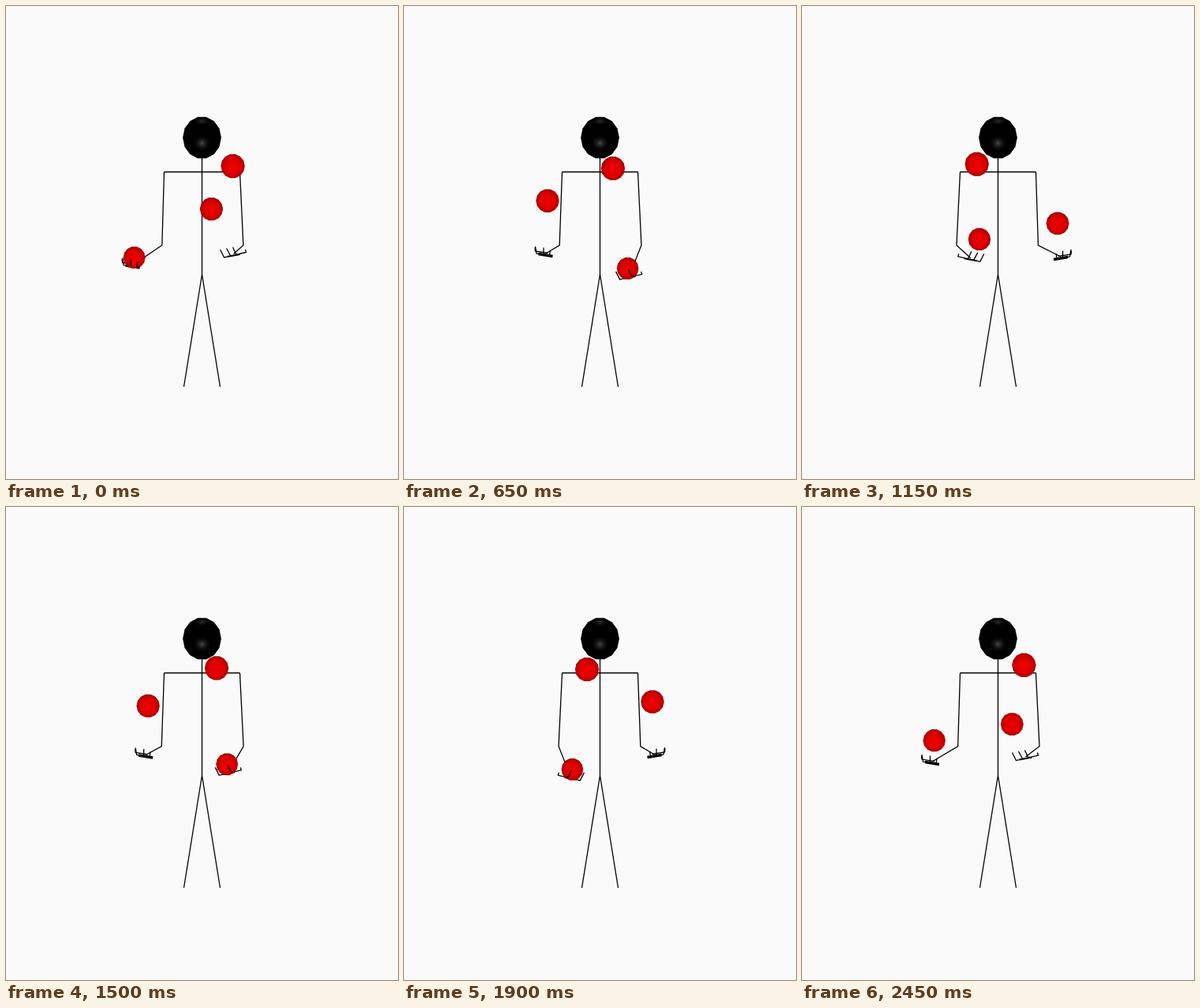
Recreate the animation shown at these times as an HTML page with a canvas. Size 497 by 600 pixels, loop 2.5 s.

```html
<!DOCTYPE html>
<html lang="en">
<head>
<meta charset="utf-8">
<title>Three-ball cascade</title>
<style>
  html, body { margin: 0; width: 100%; height: 100%; overflow: hidden; background: #fafafa; }
  canvas { display: block; }
</style>
</head>
<body>
<canvas id="stage" width="497" height="600"></canvas>
<script>
const ctx = document.getElementById('stage').getContext('2d');
const LOOP = 2500, STEP = 50;
const BEAT = LOOP / 6;        // time between throws of alternate hands
const CYCLE = 2 * BEAT;       // one hand's throw-to-throw time
const TRIP = 3 * BEAT;        // one ball's hold plus flight
const RELEASE = 267;
const MID = 248.5;

// Path of the empty hand: time, x from the body axis, y
const RETURN = [
  [267, -32, 331.5], [300, -34.5, 323.5], [367, -35, 319], [417, -40, 316.5],
  [533, -53, 313.8], [650, -69, 316], [717, -78, 318.7], [783, -83.5, 325], [CYCLE, -88, 331]
];

// Finger lines around the palm, for the throwing and the catching pose
const THROW = {
  palm: [-8, -1.5, 8, 1.5],
  inner: [8, 1.5, 12, 2.5, 17, -7.5],
  middle: [4, 0, 9, -9],
  outer: [-6, -1.5, -3, -1.5, 1, -10.5],
  thumb: [-7, -2, -16, -4, -15, -7.5]
};
const CATCH = {
  palm: [-9, -1.5, 9, 1.5],
  inner: [8, 1.5, 5, 0, 6, -6],
  middle: [-2.5, -1, -2.5, -9.5],
  outer: [-8, -1.5, -11.5, -2, -13, -11],
  thumb: [3, -2.5, -13, -5, -13.5, -9.5]
};

const mix = (a, b, k) => a + (b - a) * k;
const smooth = k => { k = Math.min(1, Math.max(0, k)); return k * k * (3 - 2 * k); };

function hermite(a, b, va, vb, span, s) {
  const s2 = s * s, s3 = s2 * s;
  return a * (2 * s3 - 3 * s2 + 1) + b * (3 * s2 - 2 * s3)
    + span * (va * (s3 - 2 * s2 + s) + vb * (s3 - s2));
}

function flight(u) {
  const y = 200.3 + 0.000491 * (u - 758) ** 2;
  return [0.117 * (u - 516) * (1 + 0.00045 * (318 - y)), y];
}

// Ball caught on the left at 0, thrown to the right, caught there at TRIP
function ballAt(u) {
  if (u >= RELEASE) return flight(u);
  const [x0, y0] = flight(TRIP), [x1, y1] = flight(RELEASE), s = u / RELEASE;
  return [
    hermite(-x0, x1, -0.105, 0.122, RELEASE, s),
    hermite(y0, y1, 0.483, -0.482, RELEASE, s)
  ];
}

function palmAt(p) {
  if (p < RELEASE) {
    const [x, y] = ballAt(p);
    return [x - 2, y + 11.5];
  }
  let i = 0;
  while (i < RETURN.length - 2 && p >= RETURN[i + 1][0]) i++;
  const a = RETURN[i], b = RETURN[i + 1], span = b[0] - a[0];
  const slope = (j, c) => {
    const l = RETURN[Math.max(0, j - 1)], r = RETURN[Math.min(RETURN.length - 1, j + 1)];
    return (r[c] - l[c]) / (r[0] - l[0]);
  };
  const at = c => hermite(a[c], b[c], slope(i, c), slope(i + 1, c), span, (p - a[0]) / span);
  return [at(1), at(2)];
}

function line(pts, width = 1.3) {
  ctx.lineWidth = width;
  ctx.beginPath();
  for (let i = 0; i < pts.length; i += 2) ctx.lineTo(pts[i], pts[i + 1]);
  ctx.stroke();
}

function facets(x, y, rx, ry, n) {
  ctx.beginPath();
  for (let i = 0; i < n; i++) {
    const a = i / n * 2 * Math.PI;
    ctx.lineTo(x + rx * Math.cos(a), y + ry * Math.sin(a));
  }
  ctx.closePath();
}

function glow(x, y, rx, ry, color) {
  ctx.save();
  ctx.translate(x, y);
  ctx.scale(rx, ry);
  const g = ctx.createRadialGradient(0, 0, 0, 0, 0, 1);
  g.addColorStop(0, color);
  g.addColorStop(1, 'rgba(0,0,0,0)');
  ctx.fillStyle = g;
  ctx.fillRect(-1, -1, 2, 2);
  ctx.restore();
}

function drawBody() {
  line([MID, 190, MID, 340.5]);
  line([225.5, 483, MID, 340.5, 271.5, 483]);
  line([200.5, 210.5, 296.5, 210.5]);
  facets(MID, 167, 24.4, 27, 14);
  ctx.save();
  ctx.fillStyle = '#000';
  ctx.fill();
  ctx.clip();
  glow(MID, 174, 12, 11, '#484848');
  glow(MID, 146, 12, 6, '#303030');
  ctx.restore();
}

function drawBall([x, y]) {
  const r = 15.2 - 0.0103 * (y - 202);
  x += MID;
  const g = ctx.createRadialGradient(x, y + r * 0.15, 0, x, y, r);
  g.addColorStop(0, '#f00000');
  g.addColorStop(0.55, '#e00000');
  g.addColorStop(0.85, '#c40000');
  g.addColorStop(1, '#960000');
  facets(x, y, r, r * 1.02, 14);
  ctx.fillStyle = g;
  ctx.fill();
}

function sided(side, draw) {
  ctx.save();
  ctx.translate(MID, 0);
  ctx.scale(side, 1);
  draw();
  ctx.restore();
}

function handAt(p) {
  const [x, y] = palmAt(p);
  const k = p < RELEASE ? 1 - smooth(p / 200) : smooth((p - 400) / 250);
  const part = name => THROW[name].map((v, i) => mix(v, CATCH[name][i], k) + (i % 2 ? y : x));
  return { x, y, k, part };
}

function drawArm(h) {
  line([-48, 210.5, -52.5 - 0.035 * (h.x + 36), 303.5, h.x, h.y - 2]);
  line(h.part('palm'), mix(2, 3.4, h.k));
  line(h.part('thumb'));
  if (h.k <= 0.5) line(h.part('middle'));
}

function drawFingers(h) {
  line(h.part('inner'));
  line(h.part('outer'));
  if (h.k > 0.5) line(h.part('middle'));
}

function draw(t) {
  ctx.fillStyle = '#fafafa';
  ctx.fillRect(0, 0, 497, 600);
  ctx.strokeStyle = '#000';
  drawBody();

  const hands = [[1, handAt(t % CYCLE)], [-1, handAt((t + BEAT) % CYCLE)]];
  for (const [side, h] of hands) sided(side, () => drawArm(h));

  for (let i = 0; i < 3; i++) {
    const u = (t + i * CYCLE) % (2 * TRIP);
    const [x, y] = ballAt(u % TRIP);
    drawBall([u < TRIP ? x : -x, y]);
  }

  for (const [side, h] of hands) sided(side, () => drawFingers(h));
}

const start = performance.now();
function tick() {
  const t = (performance.now() - start) % LOOP;
  draw(Math.floor(t / STEP) * STEP);
  requestAnimationFrame(tick);
}
tick();
</script>
</body>
</html>
```
